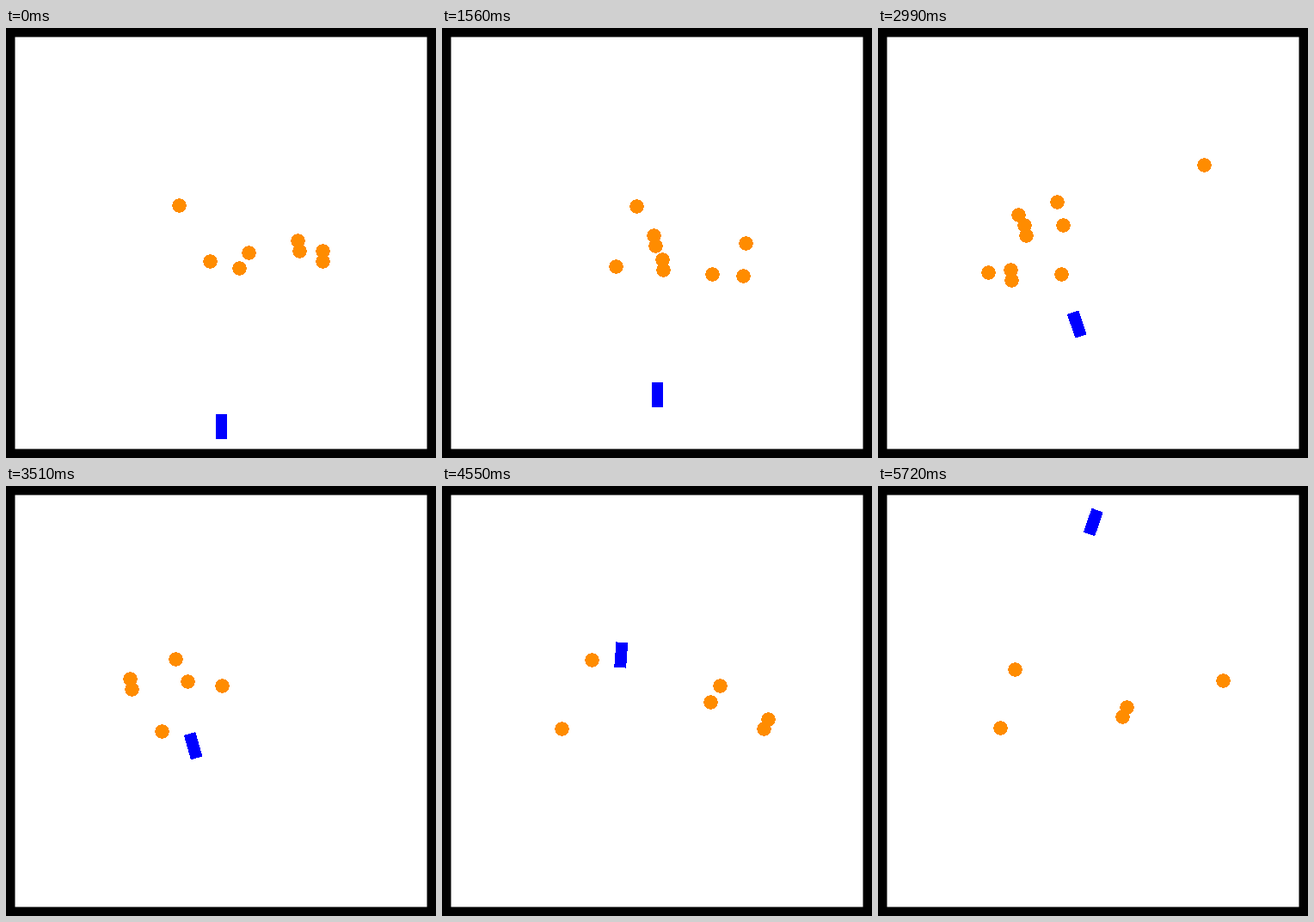
Write a matplotlib script that moves like this. It is 500x500 px and loops after 5.85 s.

```python
import numpy as np
import matplotlib.pyplot as plt
from matplotlib.animation import FuncAnimation
from matplotlib.patches import Circle, Polygon, Rectangle

SIZE, WALL = 500, 10.5
FRAMES, INTERVAL = 45, 130
RADIUS = 7.6
CAR_W, CAR_L = 12.8, 28.2
FLAT = dict(lw=0, antialiased=False, snap=False)


def curve(*keys):
    """Polynomial in time through key points (time, value, ...)."""
    data = np.array(keys, float)
    coefs = np.polyfit(data[:, 0], data[:, 1:], len(keys) - 1)
    return lambda t: np.polyval(coefs, t)


fig = plt.figure(figsize=(5, 5), dpi=100, facecolor="black")
ax = fig.add_axes([0, 0, 1, 1])
ax.set(xlim=(0, SIZE), ylim=(SIZE, 0))
ax.axis("off")
ax.add_patch(Rectangle((WALL, WALL), SIZE - 2 * WALL, SIZE - 2 * WALL,
                       facecolor="white", lw=0, snap=False))

# The car speeds up steadily, swerves left then right, and drives along its heading.
time = np.arange(FRAMES)
car_y = curve((0, 463.5), (10, 436.5), (23, 344.5), (44, 42))(time[:, None])[:, 0]
tilt = np.radians(19) * np.sin(np.pi * np.maximum(time - 13, 0) / 20.5)
car_x = 250.5 + np.cumsum(np.gradient(car_y) * np.tan(tilt))
car = ax.add_patch(Polygon(np.zeros((4, 2)), facecolor="#0000ff", **FLAT))

walkers = []


def walk(*keys, spread=(0, 0)):
    """Add a walker living from its first to last key, or a pair if spread apart."""
    path = curve(*keys)
    for side in (-1, 1) if any(spread) else (0,):
        dot = ax.add_patch(Circle((0, 0), RADIUS, facecolor="#ff8c00", **FLAT))
        walkers.append((dot, keys[0][0], keys[-1][0], path, side * np.array(spread)))


# heading left
walk((0, 340, 253), (17, 211, 242), (30, 127, 225), spread=(1, 6))
walk((0, 368, 265), (17, 210, 280), (26, 126, 291), spread=(0.5, 6))
walk((33, 397, 279), (44, 287, 263), spread=(-2.5, 5.5))
walk((0, 271, 279), (7, 236, 272), (17, 166, 284), (23, 128, 284))
# heading right
walk((0, 237, 271), (7, 301, 286), (16, 390, 284))
walk((0, 282, 261), (7, 325, 277), (17, 373, 208), (25, 375, 147))
walk((14, 132, 218), (23, 215, 229), (44, 401, 226))
walk((20, 129, 211), (27, 211, 227), (41, 394, 273))
# slowing down and lingering
walk((0, 201, 206), (7, 223, 208), (23, 208, 202), (44, 159, 213))
walk((1, 404, 279), (17, 267, 287), (27, 181, 285), (44, 142, 281))


def car_corners(x, y, angle):
    side = np.array([np.cos(angle), -np.sin(angle)]) * CAR_W / 2
    ahead = np.array([-np.sin(angle), -np.cos(angle)]) * CAR_L / 2
    return np.array([x, y]) + [side + ahead, side - ahead, -side - ahead, -side + ahead]


def draw(step):
    car.set_xy(car_corners(car_x[step], car_y[step], tilt[step]))
    for dot, start, end, path, offset in walkers:
        dot.set_visible(start <= step <= end)
        # centre on a whole pixel
        dot.center = np.round(path(step) + offset) + 0.5
    return [car] + [walker[0] for walker in walkers]


anim = FuncAnimation(fig, draw, frames=FRAMES, interval=INTERVAL, repeat=True, repeat_delay=0)
plt.show()
```
